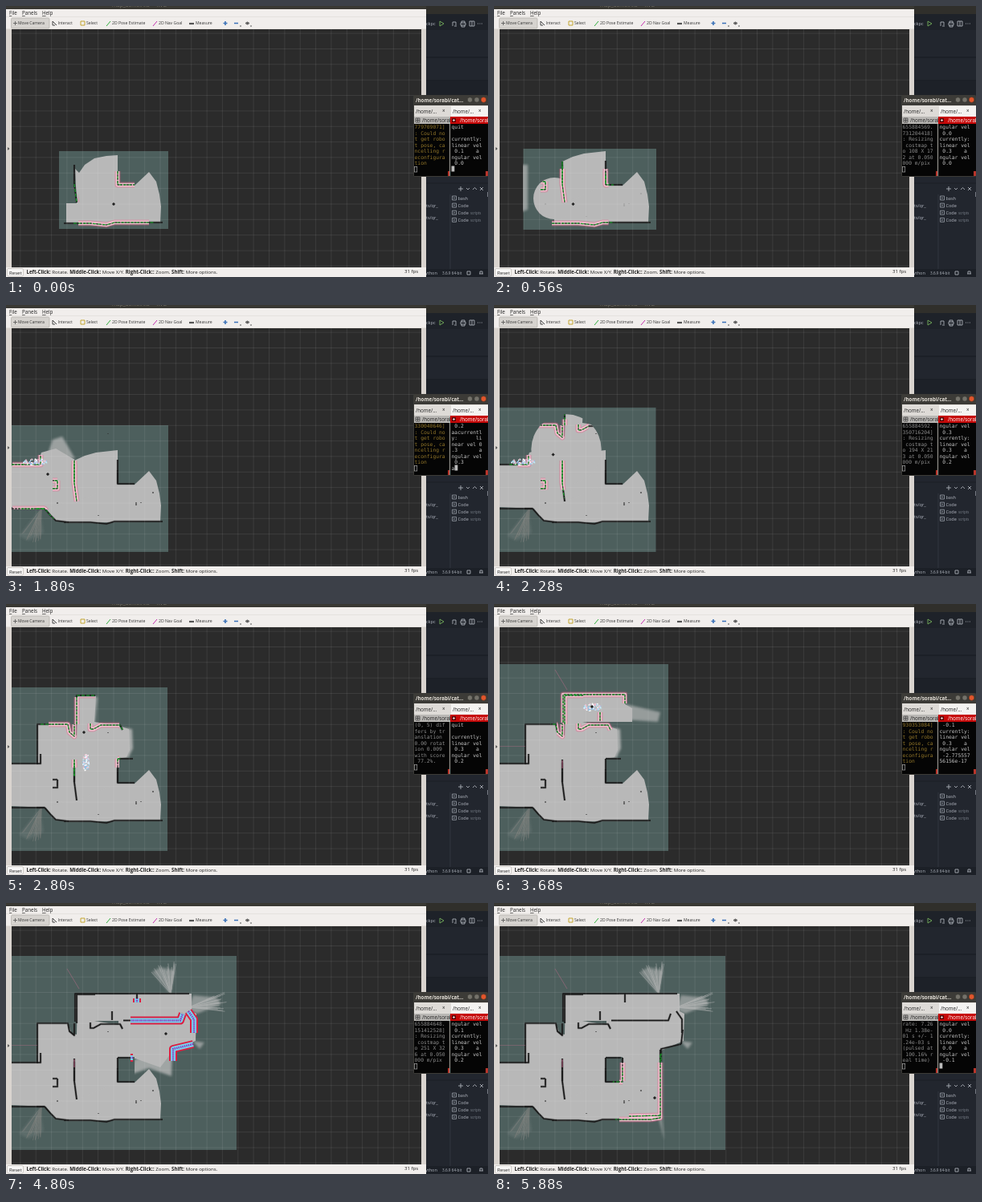
Animation of 600x338 px, one loop 5.92 s. Source, as an HTML page:

```html
<!DOCTYPE html>
<html lang="en">
<head>
<meta charset="utf-8">
<title>Mapping run</title>
<style>
html, body { margin: 0; width: 100%; height: 100%; overflow: hidden; background: #22262e; }
svg { display: block; width: 100vw; height: 100vh; }
text { font-family: "Open Sans", "Noto Sans", sans-serif; white-space: pre; }
.mono text { font: 6.35px "DejaVu Sans Mono", monospace; }
.tool { font-size: 5.1px; fill: #333; }
.menu { font-size: 6.2px; fill: #222; }
.status { font-size: 6.1px; fill: #222; }
.code { font-size: 5.5px; fill: #b4b9c2; }
.b { font-weight: 700; }
</style>
</head>
<body>
<svg viewBox="0 0 600 338">
  <defs>
    <clipPath id="view"><rect x="7" y="29" width="510" height="297"/></clipPath>
    <clipPath id="mapped"><use href="#bounds"/></clipPath>
    <clipPath id="near"><rect id="window" width="88" height="88"/></clipPath>
    <clipPath id="range"><circle id="reach" r="56"/></clipPath>
    <filter id="soft" x="-30%" y="-30%" width="160%" height="160%"><feGaussianBlur stdDeviation="1.8"/></filter>
    <g id="walls" fill="none" stroke-linejoin="round"></g>
  </defs>

  <!-- editor behind -->
  <rect width="600" height="338" fill="#22262e"/>
  <rect x="523" y="10" width="77" height="20" fill="#1e2229"/>
  <path d="M523 64H600M523 93H600" stroke="#171a20" stroke-width="1"/>
  <path d="M523 94H600V111H523Z" fill="#1d2128"/>
  <path d="M599.500 232V238" stroke="#8a9098" stroke-width=".8"/>
  <text class="code" x="523" y="24">ckpc</text>
  <g fill="none" stroke="#b9bec6" stroke-width=".8">
    <path d="M540 19V25L545 22Z" stroke="#7fbf62"/>
    <path d="M556 20V25M556 20H560V24M558 25H561"/>
    <path d="M566 21H572V24H566ZM567 21V19H571V21M567 24V26H571V24"/>
    <path d="M577 19H583V25H577ZM580 19V25"/>
    <path d="M587 22H593" stroke-dasharray="1 1.4"/>
    <path d="M563 228H569M566 225V231M573 227L575 229 577 227M581 229L583.500 226.500 586 229M590 226L594 230M594 226L590 230"/>
    <path d="M553 235V328" stroke="#363b45"/>
    <path d="M523 221H600" stroke="#1a1d23"/>
  </g>
  <text class="code" x="523" y="251">ts/qr_</text>
  <text class="code" x="523" y="266">ts/qr_</text>
  <g id="shells"></g>
  <rect x="523" y="328" width="77" height="10" fill="#1c2027"/>
  <text class="code" x="522" y="335">ython</text>
  <text x="543" y="335" font-size="4.7" fill="#b4b9c2">3.6.9 64-bit</text>
  <path d="M574 331H578V335H574ZM589 334H594M590 334V331H593V334" fill="none" stroke="#b9bec6" stroke-width=".8"/>

  <!-- viewer window -->
  <rect width="600" height="10" fill="#302f2b"/>
  <rect y="4" width="523" height="334" fill="#f1eeec"/>
  <rect y="29" width="523" height="297" fill="#d9d4cf"/>
  <rect width="523" height="4" fill="#393833"/>
  <text x="132" y=".500" font-size="6.500" fill="#77746c">map_demo.rviz* - RViz</text>
  <path d="M0 13.500H523M0 28.500H523" stroke="#dddad6" stroke-width=".6"/>
  <text class="menu" x="4" y="11"><tspan text-decoration="underline">F</tspan>ile</text>
  <text class="menu" x="20" y="11"><tspan text-decoration="underline">P</tspan>anels</text>
  <text class="menu" x="45" y="11"><tspan text-decoration="underline">H</tspan>elp</text>
  <rect x="6.500" y="15" width="47.500" height="13" rx="1.500" fill="#d6d3cf" stroke="#aaa69f" stroke-width=".6"/>
  <g id="tools"></g>
  <g fill="none" stroke-width="1">
    <path d="M11.500 19V24M9 21.500H14" stroke="#555" stroke-width=".8"/>
    <path d="M58 19V24H61M58 19L63 24" stroke="#444"/>
    <path d="M93 19H98V24H93Z" stroke="#c2a530"/>
    <path d="M125 25L130 19" stroke="#2fae3c"/>
    <path d="M183 25L188 19" stroke="#c52fb0"/>
    <path d="M228 22H234" stroke="#555" stroke-width="2.200"/>
    <path d="M270.500 21.500H275.500M273 19V24M284 21.500H289" stroke="#3d72b8" stroke-width="1.600"/>
    <path d="M298 21.500Q300.500 18.500 303 21.500 300.500 24.500 298 21.500M291 25H293M304 25H306" stroke="#555"/>
    <circle cx="300.500" cy="21.500" r="1" fill="#333"/>
  </g>

  <g clip-path="url(#view)">
    <rect x="7" y="29" width="510" height="297" fill="#2b2b2b"/>
    <rect id="bounds" fill="#4d5f5d"/>
    <g clip-path="url(#mapped)">
      <g id="haze" filter="url(#soft)"></g>
      <g id="free" fill="#b8b8b8"></g>
      <path d="M139.500 192H160V222H139.500Z" fill="#4d5f5d"/>
      <path id="specks" d="M162 246V250M183 233V235M168 246V247M115 262V263M127 160V161M64 246V248" stroke="#333" stroke-width="1.200"/>
      <use href="#walls" stroke="#444" stroke-width="3" opacity=".35"/>
      <use href="#walls" stroke="#191919" stroke-width="1.700"/>
    </g>
    <path id="grid" stroke="#fff" stroke-opacity=".15" stroke-width=".6" fill="none"/>
    <g id="traces" fill="none" stroke="#e0709a" stroke-width=".8"></g>
    <g clip-path="url(#near)">
      <use id="outer" href="#walls"/>
      <use id="middle" href="#walls"/>
      <use id="core" href="#walls"/>
    </g>
    <g clip-path="url(#range)"><use id="scan" href="#walls" stroke="#16b52c" stroke-width="1" stroke-dasharray="4 2"/></g>
    <g id="cloud"></g>
    <g id="robot"><circle r="1.500" fill="#222"/><path d="M-2 0H2M0-2V2" stroke="#222" stroke-width=".7"/></g>
  </g>
  <path d="M2 176V180L4.500 178ZM521.500 176V180L519 178Z" fill="#555"/>
  <rect x="1.500" y="327.500" width="20" height="9.500" rx="1.500" fill="#f8f7f6" stroke="#b5b1ab" stroke-width=".6"/>
  <text class="status" x="4" y="334.500">Reset</text>
  <text class="status" x="25.500" y="334"><tspan class="b">Left-Click:</tspan> Rotate. <tspan class="b">Middle-Click:</tspan> Move X/Y. <tspan class="b">Right-Click::</tspan> Zoom. <tspan class="b">Shift:</tspan> More options.</text>
  <text class="status" x="496" y="333">31 fps</text>

  <!-- terminal window -->
  <rect x="507" y="111" width="93" height="102" rx="2" fill="#3c3b37"/>
  <text class="b" x="510" y="120" font-size="6.200" fill="#e6e2da">/home/sorabi/cat…</text>
  <g stroke="#292824" stroke-width=".5"><circle cx="577.500" cy="117" r="3.200" fill="#74726a"/><circle cx="586" cy="117" r="3.200" fill="#74726a"/><circle cx="594.500" cy="117" r="3.400" fill="#e2562c"/></g>
  <rect x="508" y="124" width="92" height="14" fill="#dedbd7"/>
  <rect x="554" y="125" width="46" height="13" fill="#f4f3f1"/>
  <text class="menu" x="510" y="133.500">/home/…</text><text class="menu" x="543" y="133">×</text>
  <text class="menu" x="556" y="133.500">/home/…</text><text class="menu" x="588" y="133">×</text>
  <rect x="508" y="138" width="45" height="9" fill="#b9b7b4"/>
  <text class="menu" x="518" y="145">/home/sorabi</text>
  <path d="M510 140H515V145H510ZM512.500 140V145M510 142.500H515" fill="none" stroke="#333" stroke-width=".7"/>
  <rect x="553" y="138" width="47" height="9" fill="#c60808"/>
  <text class="menu" x="565" y="145" style="fill:#fff">/home/sorabi</text>
  <path d="M555 140H560V145H555Z" fill="#5c0808"/><path d="M557.500 141V144M556 142.500H559" stroke="#fff" stroke-width=".7"/>
  <rect x="508" y="147" width="92" height="65" fill="#050505"/>
  <path d="M552.500 147V212" stroke="#8d8b86" stroke-width="1.300"/>
  <path d="M550 206H552V212H550ZM597 206H600V212H597Z" fill="#b8342a"/>
  <g id="log" class="mono"></g>
  <g id="teleop" class="mono" fill="#c4c4c4"></g>
  <rect x="508.500" y="200.500" width="3.200" height="6.500" fill="none" stroke="#aaa" stroke-width=".7"/>
  <rect id="cursor" y="199.500" width="3.800" height="7" fill="#bbb"/>
</svg>
<script>
const LOOP = 5920, STEP = 40;
const $ = id => document.getElementById(id);
const set = (el, attrs) => { for (const k in attrs) el.setAttribute(k, attrs[k]); return el; };
const add = (parent, tag, attrs = {}, text = '') => {
  const el = set(document.createElementNS('http://www.w3.org/2000/svg', tag), attrs);
  el.textContent = text;
  return parent.appendChild(el);
};
const clamp = v => Math.max(0, Math.min(1, v));
let seed = 11;
const random = () => (seed = seed * 16807 % 2147483647) / 2147483647;

// Linear path through [time, ...values] rows.
function along(rows, t) {
  let i = 0;
  while (i < rows.length - 2 && t >= rows[i + 1][0]) i++;
  const [a, b] = [rows[i], rows[i + 1]], p = clamp((t - a[0]) / (b[0] - a[0]));
  return a.slice(1).map((v, k) => v + (b[k + 1] - v) * p);
}
const latest = (rows, t) => rows.filter(r => r[0] <= t).pop();

const boundKeys = [[0, 66, 181, 202, 278], [1120, 7, 175, 202, 280], [1800, 7, 150, 202, 308],
  [2800, 7, 104, 201, 308], [3680, 7, 75, 217, 308], [4800, 7, 66, 287, 308], [5880, 7, 66, 288, 308]];
const route = [[0, 134, 247], [1120, 63, 247], [1800, 52, 211], [2800, 97, 160], [3300, 98, 132],
  [3680, 122, 128], [4300, 195, 130], [4800, 199, 163], [5300, 184, 210], [5880, 200, 243]];

// Each area spreads out from a point between two times.
const areas = [
  { from: -2, to: -1, at: [130, 240], r: 110,
    free: 'M75 246H88L86 203 91 208 98 198 110 190 125 187 139 186V224H160L178 207 187 219 191 235 193 250 192 270 75 272Z',
    wall: 'M72 271L105 271 125 273 135 270H195M139 206V223H160M85 198V222L88 245' },
  { from: 0, to: 500, at: [110, 230], r: 70,
    free: 'M85 194L98 188 112 184 139 181V224L88 245Z', wall: 'M85 194V222M139 193V223' },
  { from: 300, to: 1050, at: [75, 240], r: 75,
    free: 'M85 192L75 197 66 212 60 186 44 198 39 200 24 250 48 252 62 269 90 272V245Z',
    wall: 'M38 254H48L55 262 62 269 78 271M64 219H58M58 229H64V219' },
  { from: 1150, to: 1750, at: [52, 211], r: 66,
    free: 'M7 199H39L44 184 62 179 84 192V245L48 254 7 252Z', wall: 'M7 199H43V187M7 254H48' },
  { from: 1900, to: 2700, at: [90, 180], r: 92,
    free: 'M39 150H77L82 163 88 164 89 115H112L110 147 140 152 153 156 154 182 150 191 139 193V224L86 245V200H39Z',
    wall: 'M39 200V150H77L79 160 85 165V150M88 150V114H111M105 149V156L109 156 118 151H142L145 157M139 193H158' },
  { from: 2900, to: 3600, at: [100, 130], r: 85,
    free: 'M86 114H163V125L172 130V147H86Z', wall: 'M86 148V113H163V124M132 135V146' },
  { from: 3800, to: 4700, at: [150, 130], r: 110,
    free: 'M155 113H231V135L237 138 236 172 208 184 192 205 161 194H140V147H155Z',
    wall: 'M163 113H228M146 146.500H217L220 138M227 135L234 145V162M233 176L208 182V197' },
  { from: 4900, to: 5500, at: [182, 215], r: 80,
    free: 'M161 194L208 183 206 270 140 271V224H161Z', wall: 'M207 183V268L195 270M207 265L168 266M160 193V222M235 158L233 176' }
];
for (const [i, a] of areas.entries()) {
  const clip = add(document.querySelector('defs'), 'clipPath', { id: 'area' + i });
  a.circle = add(clip, 'circle', { cx: a.at[0], cy: a.at[1] });
  const shown = { 'clip-path': `url(#area${i})` };
  add($('free'), 'path', { d: a.free, ...shown });
  add($('walls'), 'path', { d: a.wall, ...shown });
}

// Half-seen zones: time in, time out, shape, opacity.
const hazes = [
  [350, 1500, 'M42 198L18 198 8 222V266L42 254Z', .65],
  [600, 1500, 'M62 220L42 198 22 190 36 180 62 184Z', .6],
  [1250, 2300, 'M52 186L58 168 70 164 86 192Z', .7],
  [1300, LOOP, 'M42 255L16 288 28 294 47 284Z', .14],
  [2300, LOOP, 'M138 153L157 156 158 180 152 192 139 193Z', .8],
  [2400, 3300, 'M90 116H114L111 148 90 148Z', .7],
  [3200, 4300, 'M160 124L207 135 204 147 160 144Z', .65],
  [4100, LOOP, 'M205 114L182 86 192 80 210 84Z', .5],
  [4300, LOOP, 'M226 133L233 115 262 118 268 126 238 138Z', .6],
  [4500, LOOP, 'M232 172L247 174 241 182Z', .65],
  [4300, LOOP, 'M160 195L207 184 206 216 178 206 155 214Z', .75],
  [5300, LOOP, 'M203 262L212 296 209 264Z', .5]
].map(([from, to, d, alpha]) => ({ from, to, alpha, el: add($('haze'), 'path', { d, fill: '#bdbdbd' }) }));
// Rays within the open fans: pivot, angle range, length, time in, colour.
const rays = [[44, 254, 1.6, 2.3, 46, 1300, '#858481'], [205, 113, -2.3, -1.4, 40, 4100, '#bcbcbc'], [228, 130, -.45, .12, 48, 4300, '#bcbcbc']]
  .map(([x, y, a0, a1, len, from, stroke]) => {
    let d = '';
    for (let i = 0; i < 18; i++) {
      const a = a0 + (a1 - a0) * random(), l = len * (.7 + .3 * random());
      d += `M${x} ${y}l${(l * Math.cos(a)).toFixed(1)} ${(l * Math.sin(a)).toFixed(1)}`;
    }
    return { from, el: add($('free'), 'path', { d, stroke, 'stroke-width': .8, opacity: .6 }) };
  });
const traces = [[2500, 'M85 195V205', 1], [3000, 'M7 177.500H39', .35], [3500, 'M76 82L91 107', .45]]
  .map(([from, d, opacity]) => ({ from, el: add($('traces'), 'path', { d, opacity }) }));

const clouds = [[0, 0, 0, 0, 0], [700, 97, 257, 8, 5], [1480, 36, 195, 15, 4],
  [2320, 99, 197, 4, 11], [3200, 122, 128, 11, 5], [4200, 0, 0, 0, 0]];
const dots = Array.from({ length: 80 }, (_, i) => {
  const a = random() * 2 * Math.PI, r = Math.sqrt(random());
  return { x: r * Math.cos(a), y: r * Math.sin(a),
    el: add($('cloud'), 'rect', { width: 1.5, height: 1.5, fill: ['#fff', '#b9e6f4', '#f5bfd2', '#8fbfe8'][i % 4] }) };
});

const cell = 19.35;
let lines = '';
for (let x = 134 - cell * 6; x < 517; x += cell) lines += `M${x.toFixed(1)} 29V326`;
for (let y = 247 - cell * 11; y < 326; y += cell) lines += `M7 ${y.toFixed(1)}H517`;
set($('grid'), { d: lines });

[['Move Camera', 15], ['Interact', 64.5], ['Select', 100], ['2D Pose Estimate', 132], ['2D Nav Goal', 190], ['Measure', 236]]
  .forEach(([label, x]) => add($('tools'), 'text', { class: 'tool', x, y: 23.3 }, label));
['bash', 'Code', 'Code', 'Code'].forEach((label, i) => {
  const y = 242 + i * 9.1;
  add($('shells'), 'path', { d: `M555.500 ${y - 5}h5v5h-5ZM557 ${y - 3.5}l1.500 1-1.500 1`, fill: 'none', stroke: '#aab0b9', 'stroke-width': .7 });
  add($('shells'), 'text', { class: 'code', x: 562.5, y }, label);
  if (i > 1) add($('shells'), 'text', { x: 578, y, 'font-size': 4.4, fill: '#7d838d' }, 'scripts');
});

const wrap = s => s.match(/.{1,10}/g);
const pose = id => ['#927629', `${id}]: Could not get robot pose, cancelling reconfiguration`];
const resize = (stamp, size) => ['#8b8b8b', `${stamp}]: Resizing costmap to ${size} at 0.050000 m/pix`];
const match = (pair, turn, score) => ['#8b8b8b', `(${pair}) differs by translation 0.00 rotation ${turn} with score ${score}%.`];
const rate = (hz, pct) => ['#8b8b8b', `rate: ${hz} Hz 1.38e-01 s +/- 1.24e-03 s (pulsed at ${pct}% real time)`];
const logs = [
  [0, ...pose('779709071')], [320, ...resize('655884569.731204418', '108 X 172')], [640, ...pose('130482716')],
  [960, ...resize('655884576.144917583', '108 X 213')], [1280, ...rate('7.24', '100.09')], [1640, ...pose('330040646')],
  [2000, ...resize('655884592.350716204', '194 X 213')], [2360, ...pose('580271934')], [2680, ...match('0, 5', '0.009', '77.2')],
  [3080, ...rate('7.25', '100.12')], [3480, ...pose('930353084')], [3960, ...match('1, 8', '0.006', '74.8')],
  [4320, ...pose('220418537')], [4680, ...resize('655884648.151412528', '251 X 326')], [5080, ...pose('480917352')],
  [5400, ...match('2, 11', '0.004', '79.6')], [5720, ...rate('7.26', '100.16')]
];
const speed = (before, linear, angular) =>
  [...before, 'currently:', 'linear vel', ` ${linear}    a`, 'ngular vel', ...wrap(' ' + angular)];
const quit = ['quit', ''], turn = v => ['ngular vel', ' ' + v], tiny = '2.77555756156e-17';
const speeds = [
  [0, speed(quit, '0.1', '0.0'), 1], [240, speed(turn('0.0'), '0.2', '0.0')], [520, speed(turn('0.0'), '0.3', '0.0')],
  [800, speed(turn('0.0'), '0.3', '-0.1')], [1040, speed([' -0.1'], '0.3', tiny)], [1320, speed(turn('0.0'), '0.3', '0.2')],
  [1720, [' 0.2', 'aacurrentl', 'y:      li', 'near vel 0', '.3       a', 'ngular vel', ' 0.3', 'a'], 2],
  [2080, speed(turn('0.3'), '0.3', '0.2')], [2400, speed(turn('0.2'), '0.3', '0.1')], [2680, speed(quit, '0.3', '0.2')],
  [3080, speed(turn('0.2'), '0.3', '0.0')], [3360, speed(turn('0.0'), '0.3', '-0.1')], [3600, speed([' -0.1'], '0.3', '-' + tiny)],
  [4000, speed(turn('0.0'), '0.3', '0.1')], [4640, speed(turn('0.1'), '0.3', '0.2')], [5040, speed(turn('0.2'), '0.3', '0.1')],
  [5360, speed(turn('0.1'), '0.3', '0.0')], [5640, speed(turn('0.0'), '0.0', '-0.1'), 1]
];
const rowsOf = (id, x) => Array.from({ length: 8 }, (_, i) => add($(id), 'text', { x, y: 153.3 + i * 7.5 }));
const logRows = rowsOf('log', 508.5), speedRows = rowsOf('teleop', 554.5);
const fill = (rows, words) => rows.forEach((row, i) => { row.textContent = words[i] || ''; });

// Stroke, width, opacity and dash of each costmap layer.
const softHalo = [['#ee5f8a', 7, .4, 'none'], ['#ffd3df', 4.5, .8, 'none'], ['#3a3a3a', 1.3, 1, '3 1']];
const strongHalo = [['#dc1f42', 10, 1, 'none'], ['#78d5ec', 6, 1, 'none'], ['#8a3cc0', 2.6, 1, '1.5 1']];
function halo(strong) {
  const looks = strong ? strongHalo : softHalo;
  ['outer', 'middle', 'core'].forEach((id, i) => {
    const [stroke, width, opacity, dash] = looks[i];
    set($(id), { stroke, 'stroke-width': width, opacity, 'stroke-dasharray': dash });
  });
  set($('scan'), { opacity: strong ? 0 : 1 });
}

function draw(t) {
  const [l, top, r, b] = along(boundKeys, t), [x, y] = along(route, t);
  set($('bounds'), { x: l, y: top, width: r - l, height: b - top });
  for (const a of areas) set(a.circle, { r: a.r * clamp((t - a.from) / (a.to - a.from)) });
  for (const h of hazes) set(h.el, { opacity: h.alpha * clamp((t - h.from) / 200) * (h.to === LOOP ? 1 : clamp((h.to - t) / 200)) });
  for (const s of [...rays, ...traces]) set(s.el, { visibility: t >= s.from ? 'visible' : 'hidden' });
  set($('specks'), { opacity: clamp((t - 500) / 300) });
  set($('window'), { x: x - 44, y: y - 44 });
  set($('reach'), { cx: x, cy: y });
  set($('robot'), { transform: `translate(${x} ${y})` });
  halo(t >= 4360 && t < 5160);

  const [, cx, cy, rx, ry] = latest(clouds, t);
  set($('cloud'), { visibility: rx ? 'visible' : 'hidden' });
  for (const d of dots) set(d.el, { x: cx + d.x * rx, y: cy + d.y * ry });

  const [, color, message] = latest(logs, t), [, words, cursor] = latest(speeds, t);
  set($('log'), { fill: color });
  fill(logRows, wrap(message));
  fill(speedRows, words);
  set($('cursor'), { x: cursor === 2 ? 558.5 : 554.5, visibility: cursor ? 'visible' : 'hidden' });
}

const start = performance.now();
let shown = -1;
function tick() {
  const t = Math.floor((performance.now() - start) % LOOP / STEP) * STEP;
  if (t !== shown) draw(shown = t);
  requestAnimationFrame(tick);
}
tick();
</script>
</body>
</html>
```
